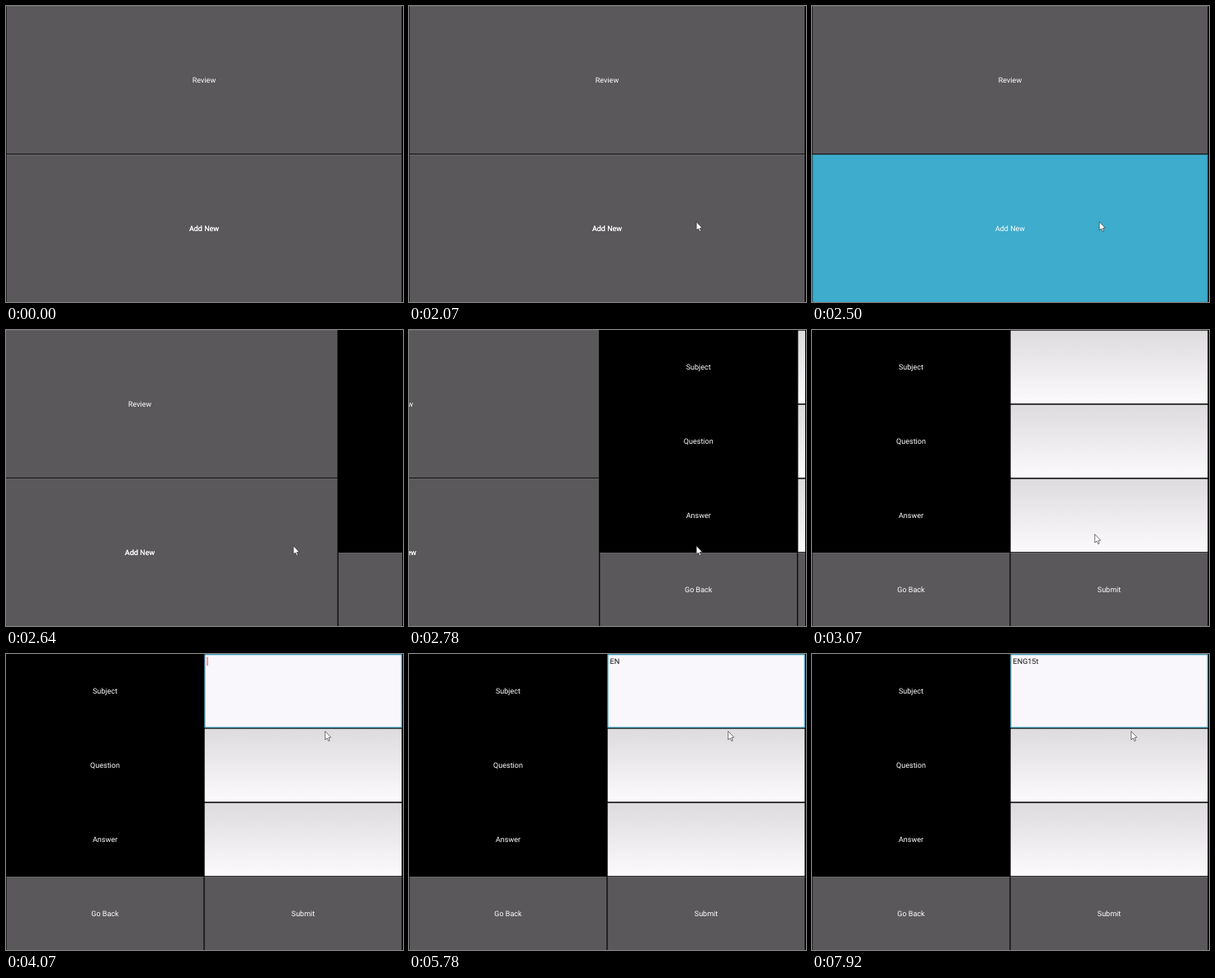
An HTML page for the animation above (8 s loop, 481 px wide and 359 px high).

```html
<!DOCTYPE html>
<html lang="en">
<head>
<meta charset="utf-8">
<title>Flash cards</title>
<style>
  html, body { margin: 0; width: 100%; height: 100%; overflow: hidden; background: #000; }
  svg { display: block; width: 100%; height: 100%; }
  text { font: 9px Roboto, "Open Sans", sans-serif; fill: #fff; text-rendering: geometricPrecision; white-space: pre; }
  .label { text-anchor: middle; }
  #entry { fill: #111; }
</style>
</head>
<body>
<svg id="stage" viewBox="0 0 481 359">
  <defs>
    <linearGradient id="paper" x1="0" y1="0" x2="0" y2="1">
      <stop offset="0" stop-color="#dddbdd"/>
      <stop offset="1" stop-color="#fcfafd"/>
    </linearGradient>
  </defs>
  <rect width="481" height="359"/>
  <g id="menu"></g>
  <g id="form"></g>
  <rect x="480" width="1" height="359"/>
  <path id="pointer" d="M-.3 -.3V10L2.1 8L3.7 11.6L5.2 11L3.8 7.5L6.7 7.2Z"
        fill="#fff" stroke="#222" stroke-width=".6" stroke-linejoin="round"/>
</svg>
<script>
const LOOP = 8000;
const GREY = '#5a585a', BLUE = '#3eaccc', EDGE = '#676567', DARK_BLUE = '#31899f';
const W = 480, ROW = 90, COL = W / 2;
const FOCUS_TICK = 24, PRESS_TICK = 14;
const byId = id => document.getElementById(id);
const menu = byId('menu'), form = byId('form'), pointer = byId('pointer');

function add(parent, tag, attrs, content) {
  const el = document.createElementNS('http://www.w3.org/2000/svg', tag);
  for (const key in attrs) el.setAttribute(key, attrs[key]);
  if (content) el.textContent = content;
  return parent.appendChild(el);
}

function rect(parent, x, y, width, height, fill, more) {
  return add(parent, 'rect', { x, y, width, height, fill, ...more });
}

function label(parent, x, y, words) {
  add(parent, 'text', { x, y: y + 3.1, class: 'label' }, words);
}

function button(parent, x, y, w, h, words) {
  rect(parent, x + .6, y + .1, w - 1.2, h - .9, GREY);
  rect(parent, x + .6, y + .1, w - 1.2, .9, EDGE);
  label(parent, x + w / 2, y + h / 2, words);
}

button(menu, 0, 0, W, 2 * ROW, 'Review');
button(menu, 0, 2 * ROW, W, 2 * ROW, 'Add New');
const pressed = rect(menu, .9, 2 * ROW + .5, W - 1.8, 2 * ROW - 1.4, BLUE,
  { stroke: DARK_BLUE, 'stroke-width': .8 });
label(menu, W / 2, 3 * ROW, 'Add New');

rect(form, 0, 0, W, 4 * ROW, '#000');
['Subject', 'Question', 'Answer'].forEach((name, row) => {
  label(form, COL / 2, (row + .5) * ROW, name);
  rect(form, COL + .7, row * ROW + .7, COL - 1.3, ROW - 1.5, 'url(#paper)');
});
button(form, 0, 3 * ROW, COL, ROW, 'Go Back');
button(form, COL, 3 * ROW, COL, ROW, 'Submit');

const focus = rect(form, COL + 1, .8, COL - 1.8, ROW - 1.8, '#f9f7fb',
  { stroke: '#35a8cc', 'stroke-width': 1 });
const textX = COL + 3.6;
const entry = add(form, 'text', { id: 'entry', x: textX, y: 12 });
const caret = rect(form, textX, 3.6, .8, 10.6, '#f00');

// The picture steps seven times a second; tick 0 is at 500 ms.
const tickAt = t => Math.floor((t + 9.5 - 500) * 7 / 1000);
const clamp = v => Math.min(1, Math.max(0, v));

// Pointer glides: first tick, number of ticks, end point.
const glides = [
  [0, 1, 169, 36], [1, 1, 264, 58], [3, 1, 446, 273], [6, 1, 473, 322],
  [7, 3, 331, 226], [11, 1, 348.5, 262], [18, 1, 343, 248],
  [19, 5, 390, 62], [25, 1, 387, 94]
];

function pointerAt(tick) {
  let x = -50, y = -50;
  for (const [from, count, toX, toY] of glides) {
    const p = clamp((tick - from + 1) / count);
    x += (toX - x) * p;
    y += (toY - y) * p;
  }
  return [x, y];
}

// Linear slide lasting 400 ms.
const slideAt = tick => W * (1 - clamp((500 + tick * 1000 / 7 - 2578) / 400));

const strokes = [
  [FOCUS_TICK, ''], [32, 'E'], [34, 'EN'], [39, 'ENG'],
  [41, 'ENG '], [46, 'ENG1'], [49, 'ENG15t']
];

const show = (el, on) => el.setAttribute('visibility', on ? 'visible' : 'hidden');
const move = (el, x, y) => el.setAttribute('transform', `translate(${x} ${y})`);

function draw(t) {
  const tick = tickAt(t);
  const slide = slideAt(tick);
  const [typedAt, typed] = strokes.filter(s => s[0] <= tick).pop() || strokes[0];
  const focused = tick >= FOCUS_TICK;

  move(pointer, ...pointerAt(tick));
  move(menu, slide - W, 0);
  move(form, slide, 0);
  show(pressed, tick === PRESS_TICK);
  show(focus, focused);

  // Each key restarts the caret's one-second blink.
  show(caret, focused && (tick - typedAt) % 7 < 3);
  if (entry.textContent !== typed) entry.textContent = typed;
  caret.setAttribute('x', textX + (typed ? entry.getComputedTextLength() : 0));
}

const start = performance.now();
function loop() {
  draw((performance.now() - start) % LOOP);
  requestAnimationFrame(loop);
}
loop();
</script>
</body>
</html>
```
